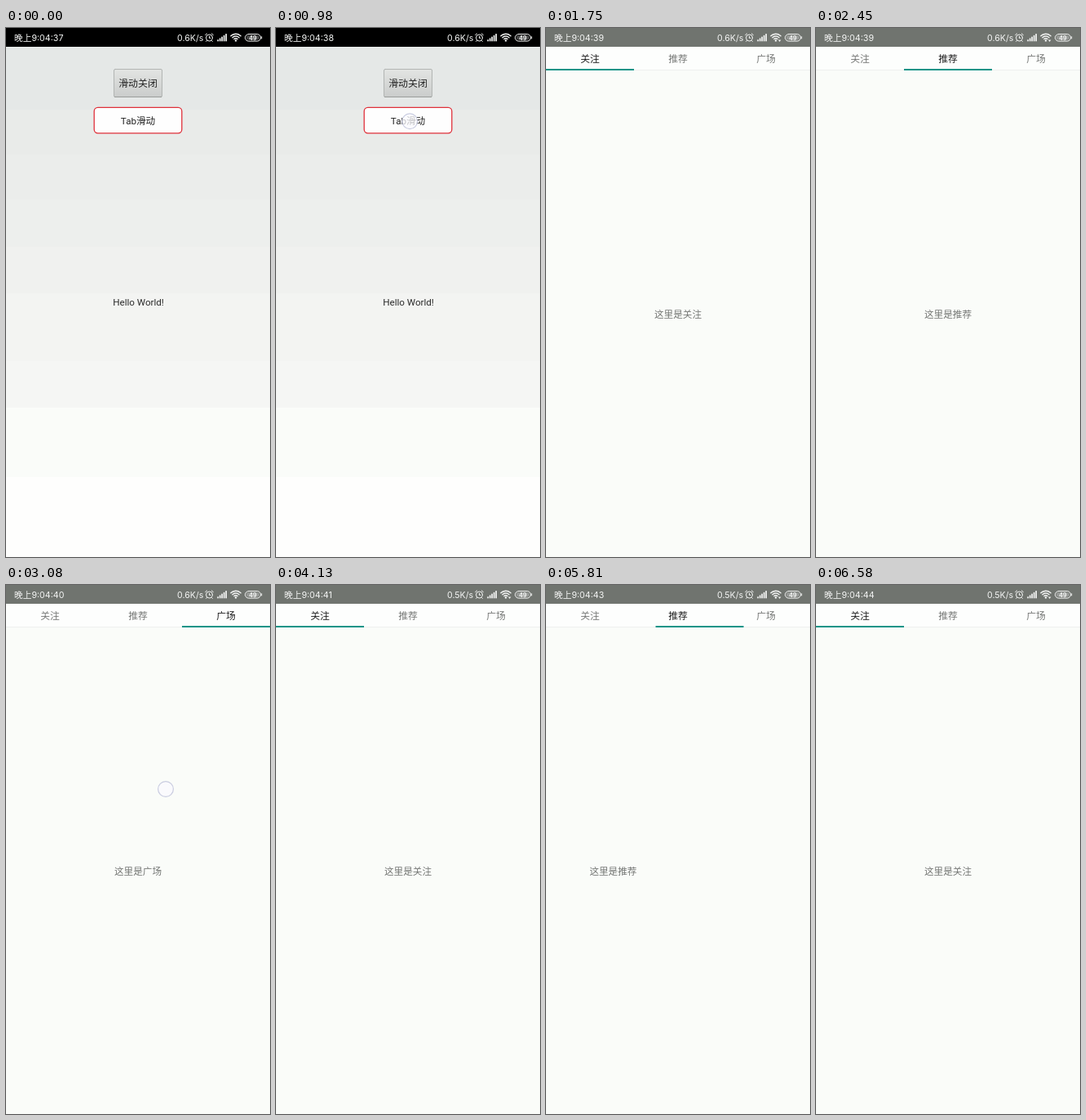
Write an HTML page with a canvas that moves like this. It is 324x648 px and loops after 6720 ms.

```html
<!DOCTYPE html>
<html lang="zh">
<head>
<meta charset="utf-8">
<title>Tab滑动</title>
<style>
html, body { margin: 0; width: 100%; height: 100%; overflow: hidden; background: #000; }
canvas { display: block; width: 324px; height: 648px; }
</style>
</head>
<body>
<canvas id="stage"></canvas>
<script>
const W = 324, H = 648, LOOP = 6720, STEP = 70, BAR = 23;
const canvas = document.getElementById('stage');
const ctx = canvas.getContext('2d');
const ratio = window.devicePixelRatio || 1;
canvas.width = W * ratio;
canvas.height = H * ratio;

const UI = 'Roboto, "Noto Sans CJK SC", "Noto Sans CJK", sans-serif';
const CLOCK = 'Inter, "Noto Sans CJK SC", "Noto Sans CJK", sans-serif';
const TABS = ['关注', '推荐', '广场'];
const BANDS = [
  [23, '#e5e8e7'], [100, '#e9ebe9'], [155, '#ebedeb'], [210, '#edefed'], [268, '#f0f1ef'],
  [325, '#f3f4f2'], [408, '#f5f6f4'], [465, '#fafcf9'], [550, '#fefefd'], [648]
];

// Swipes on the pager: finger down, finger up, settled, path, resulting tab
const SWIPES = [
  { down: 1960, up: 2170, end: 2450, path: [261, 255, 150, 262], to: 1 },
  { down: 2520, up: 2730, end: 3010, path: [255, 250, 140, 258], to: 2 },
  { down: 3080, up: 3230, end: 3570, path: [196, 250, 266, 246], to: 1 },
  { down: 3780, up: 3920, end: 4130, path: [120, 247, 205, 242], to: 0 },
  { down: 4410, up: 4690, end: 5040, path: [303, 238, 170, 246], to: 1 },
  { down: 5110, up: 5285, end: 5530, path: [276, 233, 150, 240], to: 2 },
  { down: 5670, up: 5775, end: 5950, path: [134, 246, 215, 242], to: 1 },
  { down: 6230, up: 6385, end: 6580, path: [125, 246, 205, 241], to: 0 }
];
// Touches on the first screen
const TOUCHES = [
  { down: 70, up: 735, path: [297, 330, 52, 280] },
  { down: 770, up: 1085, path: [166, 116, 163, 113] }
];
const OPEN = 1086, OPENED = 1400;

const clamp = v => Math.max(0, Math.min(1, v));
const mix = (a, b, p) => a + (b - a) * p;
const easeOut = (u, power) => 1 - Math.pow(1 - clamp(u), power);

function finger({ down, up, path: [x0, y0, x1, y1] }, t) {
  const p = Math.pow(clamp((t - down) / (up - down)), 1.3);
  return [mix(x0, x1, p), mix(y0, y1, p)];
}

function pagerAt(t) {
  let pos = 0, tab = 0;
  for (const s of SWIPES) {
    if (t < s.down) break;
    const dragged = tab + (s.path[0] - finger(s, t)[0]) / W;
    if (t < s.up) return { pos: dragged, tab };
    pos = mix(dragged, s.to, easeOut((t - s.up) / (s.end - s.up), 5));
    tab = s.to;
  }
  return { pos, tab };
}

function text(str, x, y, size, color, { align = 'center', family = UI, weight = 400 } = {}) {
  ctx.font = `${weight} ${size}px ${family}`;
  ctx.textAlign = align;
  ctx.fillStyle = color;
  ctx.fillText(str, x, y);
}

function box(x, y, w, h, r, fill, stroke, line = 1) {
  ctx.beginPath();
  ctx.roundRect(x, y, w, h, r);
  if (fill) { ctx.fillStyle = fill; ctx.fill(); }
  if (stroke) { ctx.strokeStyle = stroke; ctx.lineWidth = line; ctx.stroke(); }
}

function arc(x, y, r, from = 0, to = Math.PI * 2) {
  ctx.beginPath();
  ctx.arc(x, y, r, from, to);
}

function line(...pts) {
  ctx.beginPath();
  for (let i = 0; i < pts.length; i += 2) ctx.lineTo(pts[i], pts[i + 1]);
  ctx.stroke();
}

function drawHome() {
  for (let i = 0; i < BANDS.length - 1; i++) {
    const [y, color] = BANDS[i];
    ctx.fillStyle = color;
    ctx.fillRect(0, y, W * 2, BANDS[i + 1][0] - y);
  }
  const grad = ctx.createLinearGradient(0, 50, 0, 85);
  grad.addColorStop(0, '#e3e5e3');
  grad.addColorStop(1, '#cacccb');
  box(132.5, 50.5, 59, 34, 1.5, grad, '#b2b5b3');
  ctx.fillStyle = '#9a9d9b';
  ctx.fillRect(133, 84, 58, 1);
  text('滑动关闭', 162, 71.5, 11.9, '#222');
  box(108.2, 97.4, 107.6, 31.4, 4.5, '#fefefe', '#e0303a', 1.3);
  text('Tab滑动', 162, 118, 11.6, '#222');
  text('Hello World!', 162.5, 340, 11.6, '#2a2a2a');
}

function drawPager({ pos, tab }, radius) {
  box(0, 0, W, H, [radius, 0, 0, 0], '#fafcf9');
  ctx.save();
  ctx.clip();
  ctx.fillStyle = '#70746f';
  ctx.fillRect(0, 0, W, BAR);
  ctx.fillStyle = '#fdfefd';
  ctx.fillRect(0, BAR, W, 28);
  ctx.fillStyle = '#eef0ee';
  ctx.fillRect(0, 51, W, 1);
  ctx.fillStyle = '#0f9488';
  ctx.fillRect(pos * 108, 50, 108, 2);
  TABS.forEach((name, i) => {
    text(name, 54 + i * 108, 42, 11.8, i === tab ? '#222' : '#787a78');
    text('这里是' + name, 162 + (i - pos) * W, 354.8, 11.6, '#757775');
  });
  ctx.restore();
}

function drawStatus(t) {
  const white = '#f4f5f4';
  const left = { align: 'left', family: CLOCK };
  const sec = 37 + Math.floor((t + 470) / 1000);
  text('晚上9:04:' + sec, 10, 16, 10.7, white, left);
  text((t < 3530 ? '0.6' : '0.5') + 'K/s', 210, 16, 10.6, white, left);

  ctx.strokeStyle = ctx.fillStyle = white;
  ctx.lineCap = 'round';
  ctx.lineWidth = 1;
  arc(249.5, 12, 4); ctx.stroke();
  line(249.5, 10, 249.5, 12.3, 251, 12.3);
  line(244.6, 8.6, 246.6, 6.9);
  line(254.4, 8.6, 252.4, 6.9);
  line(246.6, 15.4, 245.6, 16.4);
  line(252.4, 15.4, 253.4, 16.4);

  for (let i = 0; i < 5; i++) {
    const h = 2 + i * 1.8;
    ctx.fillRect(259.3 + i * 2.5, 16.3 - h, 1.7, h);
  }

  ctx.lineWidth = 1.4;
  for (const r of [8.4, 5.6, 2.9]) {
    arc(282, 15.6, r, -Math.PI * 0.76, -Math.PI * 0.24);
    ctx.stroke();
  }
  arc(282, 15.4, 1.2); ctx.fill();
  const busy = (t >= 1750 && t < 2750) || t >= 3800;
  if (busy) {
    ctx.beginPath();
    ctx.moveTo(285, 14.4);
    ctx.lineTo(288.4, 14.4);
    ctx.lineTo(286.7, 17);
    ctx.fill();
  }

  box(293.5, 7.5, 19, 8.6, 4.3, null, white);
  box(295, 9, 16, 5.6, 2.8, 'rgba(255,255,255,.28)');
  ctx.fillStyle = white;
  ctx.fillRect(313.2, 10.3, 1, 3);
  text('49', 303, 14.5, 7.2, white, { family: CLOCK, weight: 700 });
}

function drawTouch(t) {
  const touch = [...TOUCHES, ...SWIPES].find(s => t >= s.down && t < s.up);
  if (!touch) return;
  const [x, y] = finger(touch, t);
  arc(x, y, 9.4);
  ctx.fillStyle = 'rgba(250,250,254,.75)';
  ctx.fill();
  ctx.strokeStyle = '#c9cce0';
  ctx.lineWidth = 1.2;
  ctx.stroke();
}

function draw(t) {
  ctx.setTransform(ratio, 0, 0, ratio, 0, 0);
  ctx.fillStyle = '#000';
  ctx.fillRect(0, 0, W, H);
  const open = t < OPEN ? 0 : easeOut((t - OPEN) / (OPENED - OPEN), 2);

  if (open < 1) {
    ctx.save();
    ctx.translate(-70.6 * open, 0);
    drawHome();
    ctx.restore();
    ctx.fillStyle = `rgba(0,0,0,${0.35 * open})`;
    ctx.fillRect(0, BAR, W, H - BAR);
  }
  if (open > 0) {
    const x = W * (1 - open);
    ctx.save();
    ctx.translate(x, 0);
    drawPager(pagerAt(t), 12 * clamp((1540 - t) / 140));
    if (open < 1) {
      ctx.fillStyle = '#dcdedc';
      ctx.fillRect(0, BAR, 1, H - BAR);
    }
    ctx.restore();
  }
  drawStatus(t);
  drawTouch(t);
}

const start = performance.now();
function tick() {
  const t = (performance.now() - start) % LOOP;
  draw(Math.floor(t / STEP) * STEP);
  requestAnimationFrame(tick);
}
tick();
</script>
</body>
</html>
```
